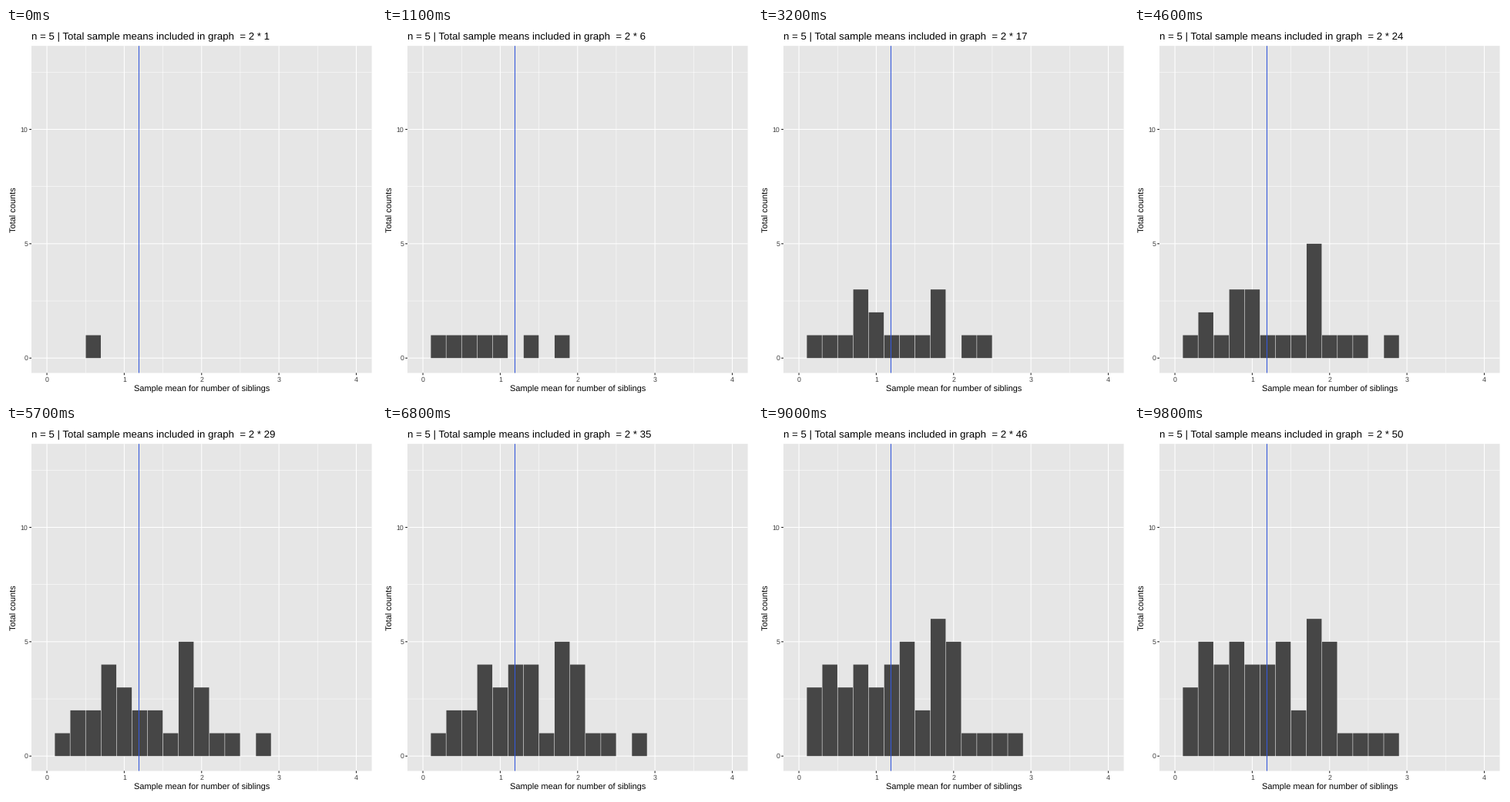
These frames come from a looping animation (480 by 480 pixels, 10000 ms). A matplotlib script:

```python
import matplotlib.pyplot as plt
from matplotlib.animation import FuncAnimation
from matplotlib.patches import Rectangle

plt.rcParams["font.family"] = "Liberation Sans"
plt.rcParams["text.hinting"] = "none"

SIZE, DPI = 480, 72
FRAMES, INTERVAL = 100, 100
LEFT, RIGHT, TOP, BOTTOM = 33.0, 474.5, 23.2, 447.5
X_MIN, X_MAX = -0.2, 4.2
Y_MIN, Y_MAX = -0.65, 13.65
BIN, BAR_WIDTH = 0.2, 0.194
MEAN = 1.19

PANEL, BAR, LINE = "#e6e6e6", "#464646", "#3558dc"
TICK, TICK_TEXT = "#222222", "#3c3c3c"

# Bin index (mean / 0.2) of each new sample; None adds nothing visible.
FIRST = 3
SAMPLES = [
    5, 1, 9, 2, 4, 7, 4, 8, 5, 12, 9, None,
    4, 6, 9, 11, 2, 10, 9, 14, None, 5, 9,
    7, 4, 10, 6, 10, 3, 7, 6, 7, 6, 10, 7, None,
    2, 9, 1, 13, 2, 3, 8, 1, 10, 5, 4, 3, 2, None,
]


def px(x):
    return LEFT + (x - X_MIN) / (X_MAX - X_MIN) * (RIGHT - LEFT)


def py(y):
    return BOTTOM - (y - Y_MIN) / (Y_MAX - Y_MIN) * (BOTTOM - TOP)


fig = plt.figure(figsize=(SIZE / DPI, SIZE / DPI), dpi=DPI, facecolor="white")
ax = fig.add_axes([0, 0, 1, 1])
ax.set_xlim(0, SIZE)
ax.set_ylim(SIZE, 0)
ax.axis("off")


def segment(x0, y0, x1, y1, color, width, z):
    ax.plot([x0, x1], [y0, y1], color=color, lw=width, zorder=z,
            solid_capstyle="butt", snap=False)


def label(x, y, text, size, color="black", **kw):
    return ax.text(x, y, text, fontsize=size, color=color, va="baseline", **kw)


def v_grid(x, width):
    segment(px(x), TOP, px(x), BOTTOM, "white", width, 1)


def h_grid(y, width):
    segment(LEFT, py(y), RIGHT, py(y), "white", width, 1)


ax.add_patch(Rectangle((LEFT, TOP), RIGHT - LEFT, BOTTOM - TOP,
                       fc=PANEL, lw=0, zorder=0, snap=False))

for x in (0.5, 1.5, 2.5, 3.5):
    v_grid(x, 0.53)
for y in (2.5, 7.5, 12.5):
    h_grid(y, 0.53)

for x in range(5):
    v_grid(x, 1.07)
    segment(px(x), BOTTOM, px(x), BOTTOM + 2.75, TICK, 1.07, 1)
    label(px(x), 459, str(x), 8.8, TICK_TEXT, ha="center")
for y in (0, 5, 10):
    h_grid(y, 1.07)
    segment(LEFT - 2.75, py(y), LEFT, py(y), TICK, 1.07, 1)
    label(28.1, py(y) + 3.1, str(y), 8.8, TICK_TEXT, ha="right")

label((LEFT + RIGHT) / 2, 472, "Sample mean for number of siblings", 11,
      ha="center")
label(13.5, (TOP + BOTTOM) / 2, "Total counts", 11, ha="center",
      rotation=90, rotation_mode="anchor")
title = label(LEFT, 15, "", 13.2)

bars = []
for i in range(15):
    x0 = px(i * BIN - BAR_WIDTH / 2)
    x1 = px(i * BIN + BAR_WIDTH / 2)
    bar = Rectangle((x0, py(0)), x1 - x0, 0, fc=BAR, lw=0, zorder=2, snap=False)
    bars.append(ax.add_patch(bar))

segment(px(MEAN), TOP, px(MEAN), BOTTOM, LINE, 1.07, 3)


def draw(frame):
    """Samples land on odd frames, the title counts up on even ones."""
    shown = [FIRST] + SAMPLES[:(frame + 1) // 2]
    for i, bar in enumerate(bars):
        count = shown.count(i)
        bar.set_height(py(count) - py(0))
        bar.set_visible(count > 0)
    title.set_text("n = 5 | Total sample means included in graph  = 2 * "
                   f"{frame // 2 + 1}")
    return [*bars, title]


anim = FuncAnimation(fig, draw, frames=FRAMES, interval=INTERVAL,
                     init_func=lambda: draw(0), repeat=True, repeat_delay=0)
plt.show()
```
